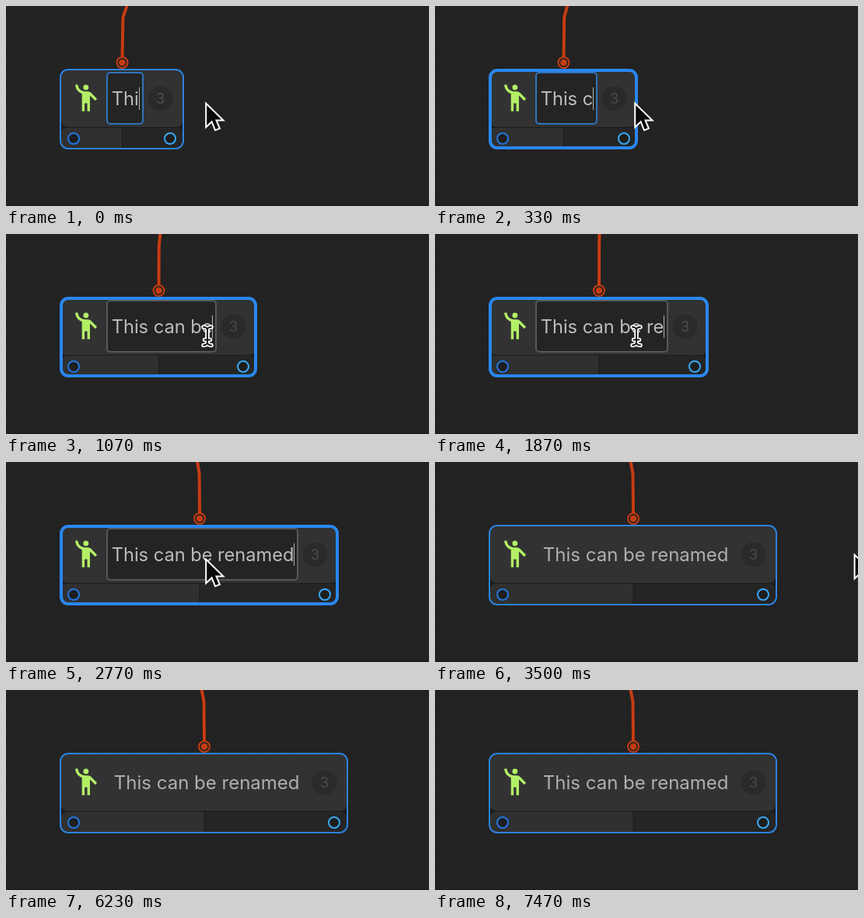
Recreate the animation shown at these times as an HTML page with a canvas. Size 544x258 px, loop 7530 ms.

```html
<!DOCTYPE html>
<html>
<head>
<meta charset="utf-8">
<style>
html, body { margin: 0; width: 544px; height: 258px; overflow: hidden; background: #222; }
canvas { display: block; }
</style>
</head>
<body>
<canvas id="stage" width="544" height="258"></canvas>
<script>
const c = document.getElementById('stage').getContext('2d');
const LOOP = 7530, COMMIT = 3000, LEFT = 69, TOP = 81, BOTTOM = 185;
const TITLE = 'This can be renamed';
// Times at which each letter after "Thi" is typed
const KEYS = [100, 220, 310, 400, 480, 570, 830, 950, 1080, 1220, 1340, 1900, 2010, 2120, 2220, 2340];
const PERSON = new Path2D('M10 4a2 2 0 1 0 4 0a2 2 0 1 0-4 0z' +
  'M15.89 8.11C15.5 7.72 14.83 7 13.53 7h-2.54C8.24 6.99 6 4.75 6 2H4c0 3.16 2.11 5.84 5 6.71' +
  'V22h2v-6h2v6h2V10.05L18.95 14l1.41-1.41z');
const ARROW = new Path2D('M1.2 3V29L8 22.6L12.6 34L16.6 32.4L12 21.4H20z');
const BEAM = new Path2D('M-5 -11.5Q-1 -11.5 0 -8.5Q1 -11.5 5 -11.5M0 -9V9' +
  'M-5 12Q-1 12 0 9Q1 12 5 12M-3.5 5H3.5');

function box(x, y, w, h, r, fill, stroke, line) {
  c.beginPath();
  c.roundRect(x, y, w, h, r);
  if (fill) { c.fillStyle = fill; c.fill(); }
  if (stroke) { c.strokeStyle = stroke; c.lineWidth = line; c.stroke(); }
}

function circle(x, y, r, fill, stroke) {
  box(x - r, y - r, 2 * r, 2 * r, r, fill, stroke, 2);
}

function text(str, x, y, size, color, align = 'left') {
  c.font = `${size}px Inter, sans-serif`;
  c.fillStyle = color;
  c.textAlign = align;
  c.fillText(str, x, y);
}

function background() {
  c.fillStyle = '#222';
  c.fillRect(0, 0, 544, 258);
  c.fillStyle = '#252525';
  for (let p = 18; p < 544; p += 18.75) {
    c.fillRect(Math.round(p), 0, 1, 258);
    c.fillRect(0, Math.round(p) - 4, 544, 1);
  }
  c.fillStyle = '#1c1a1b';
  c.fillRect(0, 257, 544, 1);
}

function wire(x) {
  const lean = (217 - x) * 0.085;
  c.beginPath();
  c.moveTo(x + lean * 1.1, -1);
  c.lineTo(x + lean * 0.15, 15);
  c.lineTo(x, 67);
  c.strokeStyle = '#c63c12';
  c.lineWidth = 4;
  c.lineJoin = 'round';
  c.stroke();
  circle(x, 73, 7, '#222', '#c63c12');
  circle(x, 73, 4.3, '#c63c12');
}

function node(right, hover) {
  const mid = (LEFT + right) / 2, w = right - LEFT, line = hover ? 4 : 2;
  c.save();
  c.beginPath();
  c.roundRect(LEFT, TOP, w, BOTTOM - TOP, 11);
  c.clip();
  c.fillStyle = '#1b1b1b';
  c.fillRect(LEFT, TOP, w, BOTTOM - TOP);
  box(LEFT + 2, TOP + 2, w - 4, 73, [9, 9, 8, 8], '#323232');
  box(LEFT + 2, 157, mid - LEFT - 2, 27, [7, 0, 0, 9], '#303030');
  box(mid + 1, 157, right - mid - 3, 27, [0, 7, 9, 0], '#252525');
  c.restore();
  box(LEFT + line / 2, TOP + line / 2, w - line, BOTTOM - TOP - line, 11 - line / 2,
    null, hover ? '#2a87ee' : '#2d83df', line);
  circle(87, 171, 7, '#1e1e1e', '#2076e3');
  circle(right - 18, 171, 7, '#1e1e1e', '#38a8f6');
  circle(right - 30.5, 119.5, 16, '#2a2a2a');
  text('3', right - 30.5, 126, 18, '#4c4c4c', 'center');
  c.save();
  c.translate(82.3, 98.2);
  c.scale(1.71, 1.71);
  c.fillStyle = '#b3ef66';
  c.fill(PERSON);
  c.restore();
}

function pointer(x, y, beam) {
  c.save();
  c.translate(x, y);
  c.lineJoin = c.lineCap = 'round';
  c.strokeStyle = '#fff';
  if (beam) {
    c.translate(2, 6.5);
    c.lineWidth = 5.5;
    c.stroke(BEAM);
    c.strokeStyle = '#111';
    c.lineWidth = 1.8;
    c.stroke(BEAM);
  } else {
    c.lineJoin = 'miter';
    c.lineWidth = 4;
    c.stroke(ARROW);
    c.fillStyle = '#0a0a0a';
    c.fill(ARROW);
  }
  c.restore();
}

function draw(t) {
  const editing = t < COMMIT;
  const typed = TITLE.slice(0, 3 + KEYS.filter(k => k <= t).length);
  c.font = '23.6px Inter, sans-serif';
  const caret = Math.round(135.7 + c.measureText(typed).width);
  const right = editing ? caret + 58 : 440;
  const fieldRight = right - 52;

  const u = Math.min(1, Math.max(0, (t - 3080) / 520));
  const glide = u * u * (3 - 2 * u);
  const px = 257 + 312 * glide, py = 125 - 6.5 * glide;

  background();
  wire((LEFT + right) / 2 + 0.5);
  node(right, px < right);
  if (editing) {
    box(130, 86, fieldRight - 131, 66, 4, '#242424', fieldRight > 259 ? '#585858' : '#2e74bd', 2);
    text(typed, 135.7, 128, 23.6, '#bdbdbd');
    c.fillStyle = '#b4b4b4';
    c.fillRect(caret, 105, 1, 29);
  } else {
    text(TITLE, 138.8, 128, 24, '#b0b0b0');
  }
  if (u < 1) pointer(px, py, t >= 950 && t < 2500);
}

function frame() {
  draw(performance.now() % LOOP);
  requestAnimationFrame(frame);
}
frame();
</script>
</body>
</html>
```
